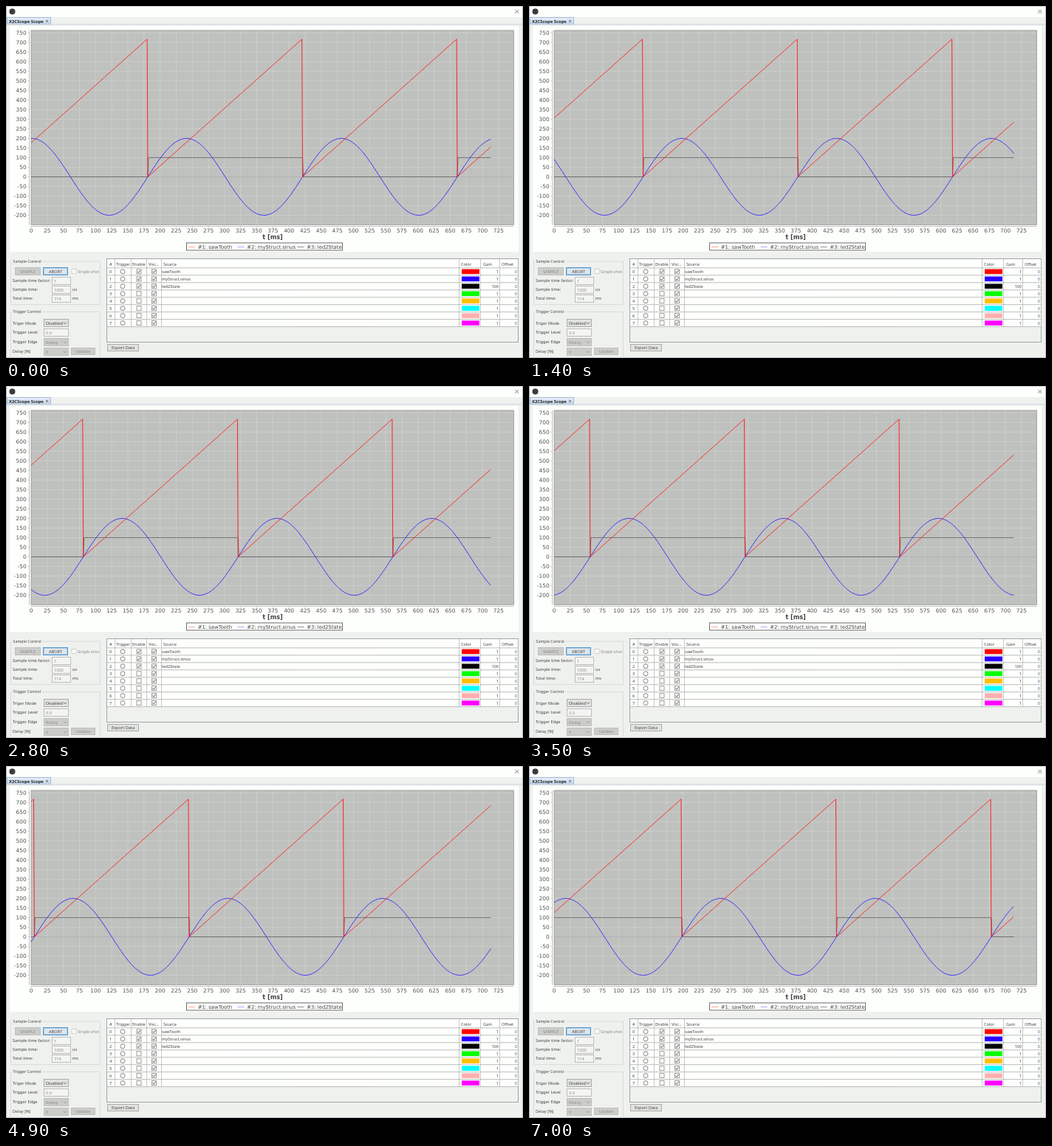
Recreate the animation shown at these times as an HTML page with a canvas. Size 700 by 477 pixels, loop 7.7 s.

```html
<!DOCTYPE html>
<html lang="en">
<head>
<meta charset="utf-8">
<title>Scope</title>
<style>
html, body { margin: 0; width: 100%; height: 100%; overflow: hidden; background: #eff1ee; }
canvas { display: block; width: 700px; height: 477px; }
</style>
</head>
<body>
<canvas id="stage" width="700" height="477"></canvas>
<script>
const ctx = document.getElementById('stage').getContext('2d');
const UI = '"Noto Sans", "Open Sans", sans-serif';
const CHART = '"DejaVu Sans", sans-serif';
const INK = '#444', DIM = '#8c8c8c', EDGE = '#adadad';
const WHITE = '#fdfffc', PANEL = '#eff1ee';

// One capture: sample index of the first ramp peak, LED level before it
const STEP = 700;
const captures = [
  [180, 0], [159, 0], [137, 0], [109, 0], [80, 0], [55, 0],
  [30, 0], [4, 0], [232, 1], [220, 0], [197, 1]
];
const PERIOD = 240, SAMPLES = 714;
const plot = { l: 34, t: 33, r: 687.5, b: 296.5 };
const px = t => plot.l + t * 0.873;
const py = v => 231.5 - v * 0.2602;

function rect(x, y, w, h, fill, stroke) {
  if (fill) {
    ctx.fillStyle = fill;
    ctx.fillRect(x, y, w, h);
  }
  if (stroke) {
    ctx.strokeStyle = stroke;
    ctx.lineWidth = 1;
    ctx.strokeRect(x + 0.5, y + 0.5, w - 1, h - 1);
  }
}

function line(points, color, width = 1) {
  ctx.beginPath();
  points.forEach(([x, y]) => ctx.lineTo(x, y));
  ctx.strokeStyle = color;
  ctx.lineWidth = width;
  ctx.stroke();
}

// y is the middle of the capital letters
function text(s, x, y, { size = 5.6, color = INK, align = 'left', family = UI, weight = '' } = {}) {
  ctx.font = `${weight} ${size}px ${family}`;
  ctx.fillStyle = color;
  ctx.textAlign = align;
  ctx.fillText(s, x, y + size * 0.36);
}

function button(label, x, y, w, h, fill, edge, color) {
  rect(x, y, w, h, fill, edge);
  text(label, x + w / 2, y + h / 2, { color, align: 'center' });
}

function field(value, x, y, w, h = 11) {
  rect(x, y, w, h, '#f3f5f2', '#bdbdbd');
  text(value, x + 3, y + h / 2, { color: DIM });
}

function combo(value, y, on) {
  rect(51, y, 34, 11, on ? '#e1e3e0' : '#cbcdca', on ? EDGE : '#bfbfbf');
  text(value, 54, y + 5.5, { color: on ? INK : DIM });
  line([[78, y + 4.7], [80, y + 6.7], [82, y + 4.7]], on ? '#444' : '#888', 0.8);
}

function checkbox(x, y, on, edge = '#858585') {
  rect(x - 3.5, y - 3.5, 7, 7, WHITE);
  ctx.strokeStyle = edge;
  ctx.lineWidth = 0.8;
  ctx.strokeRect(x - 3, y - 3, 6, 6);
  if (on) line([[x - 2, y], [x - 0.6, y + 1.6], [x + 2.2, y - 1.8]], '#444', 0.9);
}

function group(title, y, bottom, titleEnd) {
  line([[8, y], [6.5, y], [6.5, bottom], [127.5, bottom], [127.5, y], [titleEnd, y]], '#dadcd9');
  text(title, 9.5, y, { size: 5.3 });
}

function drawWindow() {
  rect(0, 0, 700, 477, PANEL);
  rect(0, 0, 700, 15, WHITE);
  line([[0, 0.5], [700, 0.5]], '#c9ccd0');
  ctx.fillStyle = '#3c3c3c';
  ctx.beginPath();
  ctx.arc(8.5, 7.5, 4, 0, 2 * Math.PI);
  ctx.fill();
  line([[689.3, 5], [694.3, 10]], '#666', 0.8);
  line([[694.3, 5], [689.3, 10]], '#666', 0.8);

  const tab = ctx.createLinearGradient(0, 15, 0, 25);
  tab.addColorStop(0, '#eaf0f9');
  tab.addColorStop(1, '#c3d5ec');
  rect(1, 15, 60, 10, tab, '#a9bad0');
  text('X2CScope Scope', 4, 20.4, { size: 5.9, color: '#222', weight: 'bold' });
  line([[54, 18.9], [57, 21.9]], '#444', 0.8);
  line([[57, 18.9], [54, 21.9]], '#444', 0.8);
  line([[0, 25], [700, 25]], '#c9d4e1');
  line([[0.5, 0], [0.5, 477]], '#a9b4c2');
  line([[699.5, 0], [699.5, 477]], '#b4bcc8');
  line([[0, 476.5], [700, 476.5]], '#b4bcc8');
}

function drawChart() {
  const { l, t, r, b } = plot;
  const grid = 'rgba(255,255,255,.5)';
  rect(5, 27, 689, 306, WHITE);
  rect(l, t, r - l, b - t, '#bfc1be');
  ctx.setLineDash([1.4, 1.1]);
  for (let x = 25; x <= 725; x += 25) line([[px(x), t], [px(x), b]], grid, 0.7);
  for (let v = -200; v <= 750; v += 50) line([[l, py(v)], [r, py(v)]], grid, 0.7);
  ctx.setLineDash([]);
  line([[l, py(0)], [r, py(0)]], 'rgba(120,120,130,.45)', 0.7);
  line([[l, t], [r, t], [r, b], [l, b], [l, t]], '#979997', 0.8);
  line([[31.5, t], [31.5, b]], '#a8a8a8', 0.7);
  line([[l, 298.5], [r, 298.5]], '#a8a8a8', 0.7);

  const tick = { size: 7.4, color: '#555', family: CHART };
  for (let v = -200; v <= 750; v += 50) {
    text(v, 27.6, py(v) + 0.2, { ...tick, align: 'right' });
    line([[30, py(v)], [31.5, py(v)]], '#a8a8a8', 0.7);
  }
  for (let x = 0; x <= 725; x += 25) {
    text(x, px(x), 304, { ...tick, align: 'center' });
    line([[px(x), 298.5], [px(x), 300]], '#a8a8a8', 0.7);
  }
  text('t [ms]', 361, 312.8, { size: 8.2, color: '#444', family: CHART, weight: 'bold', align: 'center' });

  rect(244, 320.5, 212, 11, WHITE, '#6c6c6c');
  [['#1: sawTooth', 247, '#ffa384'], ['#2: myStruct.sinus', 313.5, '#a4a4ff'], ['#3: led2State', 394.5, '#858585']]
    .forEach(([name, x, color]) => {
      line([[x, 326.5], [x + 9, 326.5]], color, 0.9);
      text(name, x + 12.7, 326.5, { ...tick, size: 6.85, color: '#444' });
    });
}

function drawControls() {
  group('Sample Control', 346, 404.5, 49);
  button('SAMPLE', 12, 354, 35, 11, '#cbcdca', '#bfbfbf', DIM);
  button('ABORT', 50, 354, 34, 11, '#e1e6ea', '#4f97d3', INK);
  rect(51, 355, 32, 9, null, 'rgba(79,151,211,.35)');
  checkbox(92, 359.5, false, '#c4c4c4');
  text('Single-shot', 97, 359.5, { color: DIM });
  [['Sample time factor:', '1', ''], ['Sample time:', '1000', 'us'], ['Total time:', '714', 'ms']]
    .forEach(([label, value, unit], i) => {
      const y = 372 + 12 * i;
      text(label, 9, y);
      field(value, 62, y - 5, 26);
      text(unit, 90, y);
    });

  group('Trigger Control', 414.5, 490, 49);
  ['Triger Mode', 'Trigger Level', 'Trigger Edge', 'Delay [%]']
    .forEach((label, i) => text(label, 9, 429.5 + 12.9 * i));
  combo('Disabled', 424, true);
  field('0.0', 51, 437, 34);
  combo('Rising', 450, false);
  combo('0', 463, false);
  button('Update', 88, 463, 33, 10, '#cbcdca', '#bfbfbf', DIM);
}

function drawTable() {
  const pitch = 9.96, top = 354.9, bottom = top + 8 * pitch;
  rect(136, 342, 558, 114, PANEL, '#a2a5a8');
  rect(137, 343, 556, bottom - 343, WHITE);
  const cols = [147, 169, 190, 210, 613, 642, 668, 693];
  cols.forEach(x => line([[x + 0.5, 343], [x + 0.5, bottom]], '#b9bbb9', 0.8));
  for (let i = 0; i <= 8; i++) {
    const y = top + pitch * i;
    line([[137, y], [693, y]], '#acaeac', 0.8);
  }
  [['#', 140], ['Trigger', 149], ['Enable', 171], ['Visi...', 193], ['Source', 213],
   ['Color', 616], ['Gain', 646], ['Offset', 671]]
    .forEach(([s, x]) => text(s, x, 349.7));

  const sources = ['sawTooth', 'myStruct.sinus', 'led2State'];
  const colors = ['#ff0000', '#2a00ff', '#000000', '#00ff00', '#ffc000', '#00ffff', '#ffafaf', '#ff00ff'];
  colors.forEach((color, i) => {
    const y = top + pitch * (i + 0.5);
    text(i, 140, y);
    ctx.beginPath();
    ctx.arc(158, y, 3, 0, 2 * Math.PI);
    ctx.strokeStyle = '#6c6c6c';
    ctx.lineWidth = 0.8;
    ctx.stroke();
    checkbox(180, y, i < 3);
    checkbox(200.5, y, true);
    text(sources[i] || '', 211, y);
    rect(617, y - 3.3, 24, 6.6, color);
    text(i === 2 ? 100 : 1, 667, y, { align: 'right', color: '#445' });
    text(0, 692, y, { align: 'right', color: '#4a5888' });
  });
  button('Export Data', 137, 458, 43, 10, '#e1e3e0', EDGE, INK);
}

function drawTraces([peak, level]) {
  const zero = peak + 1;
  const trace = (f, color, width) => {
    const points = [];
    for (let t = 0; t < SAMPLES; t++) points.push([px(t), py(f(t))]);
    line(points, color, width);
  };
  const led = t => {
    const turns = Math.floor((t - zero - 1) / PERIOD) + 1;
    return 100 * ((level + turns) & 1);
  };
  const sine = t => 200 * Math.sin(2 * Math.PI * (t - zero) / PERIOD);
  const saw = t => 3 * ((t - zero + 2 * PERIOD) % PERIOD);
  ctx.lineJoin = 'round';
  trace(led, '#505050', 0.8);
  trace(sine, 'rgba(40,28,255,.88)', 1);
  trace(saw, 'rgba(255,20,20,.9)', 1);
  ctx.lineJoin = 'miter';
}

function drawScene(capture) {
  drawWindow();
  drawChart();
  drawTraces(capture);
  drawControls();
  drawTable();
}

const start = performance.now();
let shown = -1;
function tick() {
  const now = Math.max(0, performance.now() - start);
  const i = Math.floor(now / STEP) % captures.length;
  if (i !== shown) drawScene(captures[shown = i]);
  requestAnimationFrame(tick);
}
tick();
</script>
</body>
</html>
```
